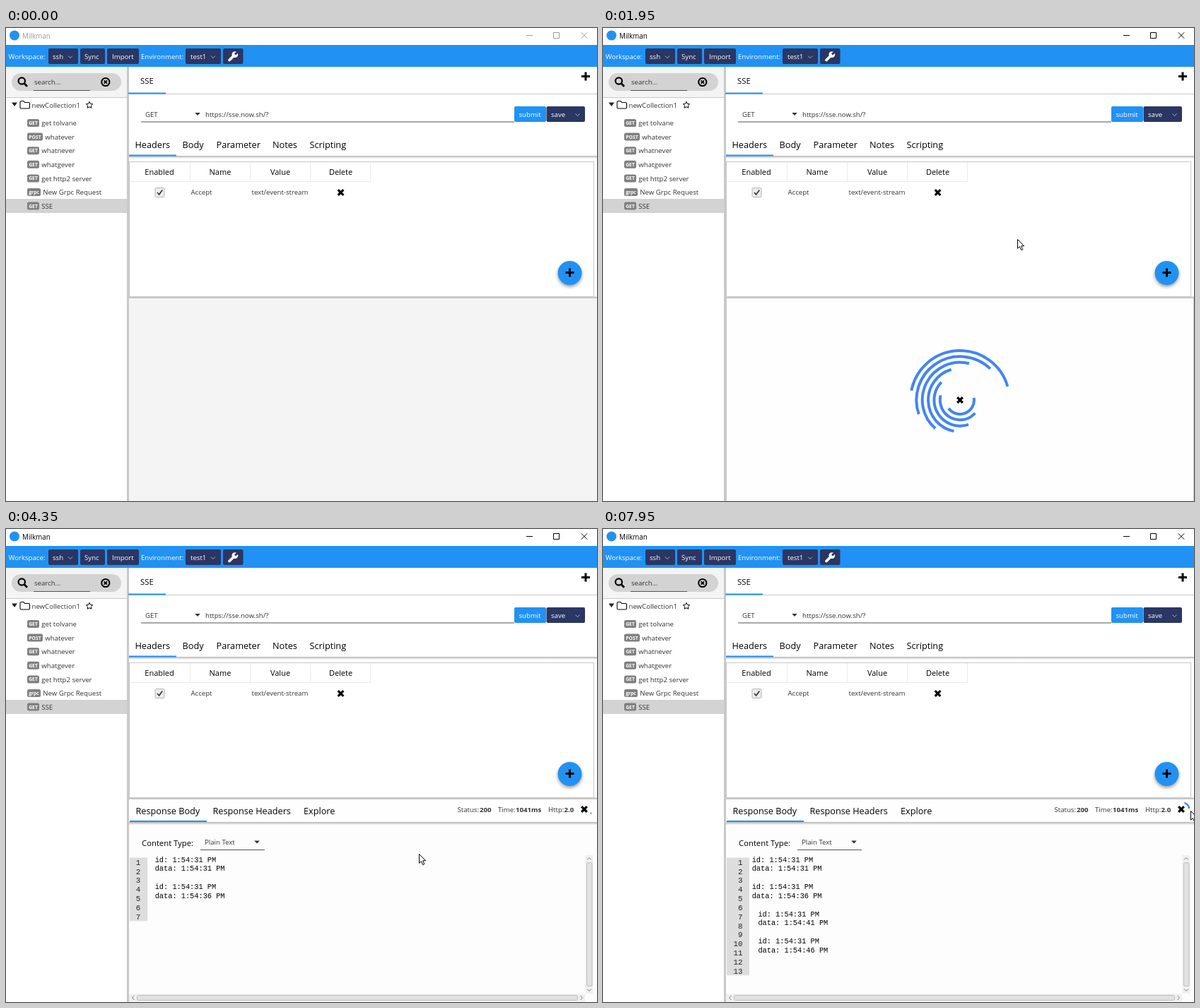
Recreate the animation shown at these times as an HTML page. Size 836 px wide and 670 px high, loop 8000 ms.

```html
<!DOCTYPE html>
<html lang="en">
<head>
<meta charset="utf-8">
<title>Milkman</title>
<style>
  html, body { margin: 0; width: 100%; height: 100%; overflow: hidden; background: #fff; }
  svg { display: block; width: 836px; height: 670px; }
  text { font: 9.65px "Open Sans", "Noto Sans", sans-serif; fill: #333; white-space: pre; }
  .tab { font-size: 12.7px; fill: #000; }
  .head { font-size: 11px; fill: #000; text-anchor: middle; }
  .inv { fill: #fff; }
  .b { font-weight: 700; }
  .badge { font-size: 6.8px; font-weight: 700; fill: #fff; text-anchor: middle; }
  .code { font: 10.3px "Liberation Mono", "Courier New", monospace; fill: #000; }
  .num { font: 10.8px "Liberation Mono", "Courier New", monospace; fill: #222; text-anchor: end; }
  .blue { fill: #2192f3; }
  .dark { fill: #2a3663; }
  .gray { fill: #c8c8c8; }
  .line { fill: none; stroke: #000; }
  .chev { fill: none; stroke: #a9aec4; stroke-width: 1; }
</style>
</head>
<body>
<svg viewBox="0 0 836 670">
  <defs>
    <linearGradient id="shade" x2="0" y2="1">
      <stop offset="0" stop-color="#b4b4b4"/><stop offset="1" stop-color="#fff"/>
    </linearGradient>
    <filter id="soft" x="-50%" y="-50%" width="200%" height="200%"><feGaussianBlur stdDeviation="2.5"/></filter>
    <path id="cross" d="M-3.8-3.8 3.8 3.8M3.8-3.8-3.8 3.8" stroke="#000" stroke-width="3.2"/>
    <path id="plus" d="M-6 0H6M0-6V6" stroke="#000" stroke-width="3"/>
    <path id="caret" d="M-3.8-2H3.8L0 2Z" fill="#333"/>
    <path id="chev" class="chev" d="M-3-1.5 0 1.5 3-1.5"/>
  </defs>

  <!-- title bar -->
  <rect width="836" height="670" fill="#fff"/>
  <circle cx="12" cy="10.5" r="7" class="blue"/>
  <text id="title" x="23" y="14.5" style="font-size:9.9px">Milkman</text>
  <path id="winBtns" class="line" d="M736 10.5H745M774.5 6.5h8v8h-8ZM813.8 6.3l8.4 8.4M822.2 6.3l-8.4 8.4"/>

  <!-- toolbar -->
  <rect y="24" width="836" height="31" class="blue"/>
  <g class="dark">
    <rect x="60" y="29" width="42" height="22" rx="2"/>
    <rect x="105" y="29" width="35" height="22" rx="2"/>
    <rect x="143" y="29" width="45" height="22" rx="2"/>
    <rect x="254" y="29" width="50" height="22" rx="2"/>
    <rect x="307" y="29" width="28.500" height="22" rx="2"/>
  </g>
  <text class="inv" x="3.500" y="44">Workspace:</text>
  <text class="inv" x="66" y="44">ssh</text>
  <text class="inv" x="111" y="44">Sync</text>
  <text class="inv" x="150" y="44">Import</text>
  <text class="inv" x="191" y="44">Environment:</text>
  <text class="inv" x="261" y="44">test1</text>
  <use href="#chev" x="91" y="41"/><use href="#chev" x="293" y="41"/>
  <path d="M316 45.500 323 38.500" stroke="#fff" stroke-width="3.800" stroke-linecap="round"/>
  <circle cx="323.800" cy="37.600" r="4.400" fill="#fff"/>
  <path d="M324 37.500 329 32.500" stroke="#2a3663" stroke-width="3"/>

  <!-- sidebar -->
  <rect y="55" width="171" height="43" fill="#f4f4f4"/>
  <rect y="98" width="171" height="1" class="gray"/>
  <rect x="8" y="64" width="155" height="25" rx="12.500" fill="#d3d3d3"/>
  <circle cx="22.300" cy="75" r="4.700" class="line" stroke-width="2.200"/>
  <path class="line" d="M25.800 78.500 30 82.700" stroke-width="2.800"/>
  <text x="40" y="80" fill="#555">search...</text>
  <rect x="39" y="88" width="80" height="1" fill="#555"/>
  <circle cx="140.800" cy="76.500" r="5.600" class="line" stroke-width="2"/>
  <path class="line" d="M138.600 74.300l4.400 4.400M143 74.300l-4.400 4.400" stroke-width="1.900"/>
  <path d="M8 105.500H16L12 111Z" fill="#222"/>
  <path class="line" d="M20 105q0-1.500 1.500-1.500H25l1.500 2H32q1.500 0 1.500 1.500v5.500q0 1.500-1.500 1.500H21.500q-1.500 0-1.500-1.500Z" stroke-width="1.100"/>
  <text x="36.500" y="112.500">newCollection1</text>
  <path class="line" d="M118 104.300l1.400 3 3.300.4-2.400 2.300.6 3.300-2.900-1.600-2.900 1.600.6-3.300-2.400-2.300 3.300-.4Z"/>
  <rect y="242" width="171" height="20" fill="#d3d3d3"/>
  <g id="tree"></g>
  <rect x="171" y="55" width="3" height="615" class="gray"/>

  <!-- request -->
  <text x="190" y="79" style="font-size:11.300px;fill:#000">SSE</text>
  <rect x="174" y="93" width="662" height="1" class="gray"/>
  <rect x="173" y="91.500" width="53" height="2" class="blue"/>
  <use href="#plus" x="820" y="68.500"/>
  <text x="197" y="125.500">GET</text>
  <use href="#caret" x="271" y="122"/>
  <text x="282" y="125.500">https://sse.now.sh/?</text>
  <rect x="191" y="132.500" width="528" height="1" fill="#555"/>
  <rect x="719" y="111" width="45" height="22" rx="2" class="blue"/>
  <rect x="764.500" y="111" width="54.500" height="22" rx="2" class="dark"/>
  <text class="inv" x="725.500" y="125.500">submit</text>
  <text class="inv" x="771" y="125.500">save</text>
  <use href="#chev" x="808.500" y="123"/>
  <text class="tab" x="182.500" y="170">Headers</text>
  <text class="tab" x="249.500" y="170">Body</text>
  <text class="tab" x="297.500" y="170">Parameter</text>
  <text class="tab" x="377" y="170">Notes</text>
  <text class="tab" x="429.500" y="170">Scripting</text>
  <rect x="174" y="181" width="662" height="4" fill="url(#shade)"/>
  <rect x="174" y="179.500" width="67" height="2" class="blue"/>
  <rect x="174.500" y="189.500" width="657" height="191" fill="#fff" stroke="#c8c8c8"/>
  <path d="M175 217.500H515M260.500 190V218M345.500 190V218M430.500 190V218M515.500 190V218" stroke="#ebebeb"/>
  <text class="head" x="217" y="208">Enabled</text>
  <text class="head" x="303" y="208">Name</text>
  <text class="head" x="388" y="208">Value</text>
  <text class="head" x="473.500" y="208">Delete</text>
  <rect x="211" y="226.500" width="13" height="13" rx="1.500" fill="#ececec" stroke="#b5b5b5"/>
  <path class="line" d="M214 233l2.600 3 4.600-6.400" style="stroke:#333;stroke-width:1.700"/>
  <text x="261.500" y="236">Accept</text>
  <text x="347.500" y="236">text/event-stream</text>
  <use href="#cross" x="473.500" y="233"/>
  <circle cx="797.500" cy="349.500" r="17" fill="#000" opacity=".4" filter="url(#soft)"/>
  <circle cx="797.500" cy="347" r="17" class="blue"/>
  <use href="#plus" x="797.500" y="346.500"/>

  <!-- response -->
  <rect x="174" y="380.500" width="662" height="3" class="gray"/>
  <rect id="idle" x="174" y="383" width="662" height="287" fill="#f4f4f4"/>
  <g id="wait">
    <path d="M174.500 383V670M835.500 383V670" stroke="#c8c8c8"/>
    <path id="swirl" fill="none" stroke="#4285f4" stroke-width="4"/>
    <use href="#cross" x="505" y="527"/>
  </g>
  <g id="result">
    <rect x="174" y="416" width="662" height="254" fill="#fdfdfd"/>
    <text class="tab" x="183.500" y="404">Response Body</text>
    <text class="tab" x="292.500" y="404">Response Headers</text>
    <text class="tab" x="421" y="404">Explore</text>
    <rect x="174" y="415" width="662" height="4.500" fill="url(#shade)"/>
    <rect x="175" y="413" width="109" height="2" class="blue"/>
    <text x="638.500" y="400.500">Status:</text><text class="b" x="670" y="400.500">200</text>
    <text x="696" y="400.500">Time:</text><text class="b" x="721" y="400.500">1041ms</text>
    <text x="767" y="400.500">Http:</text><text class="b" x="789.500" y="400.500">2.0</text>
    <use href="#cross" x="818" y="397"/>
    <path id="ring" fill="none" stroke-width="2.400"/>
    <text x="192" y="448.500" style="font-size:11.300px;fill:#000">Content Type:</text>
    <text x="281" y="447">Plain Text</text>
    <use href="#caret" x="355" y="443.500"/>
    <rect x="275" y="454" width="91" height="1" fill="#555"/>
    <rect id="gutter" x="175" y="465.500" fill="#ddd"/>
    <g id="nums"></g>
    <g id="lines"></g>
    <rect x="819.500" y="462" width="11" height="196" fill="#f0f0f0"/>
    <rect x="174" y="658.500" width="645" height="11" fill="#f0f0f0"/>
    <g fill="#e2e2e2" stroke="#bdbdbd">
      <rect x="821.500" y="472.500" width="7.500" height="175" rx="2"/>
      <rect x="185.500" y="660.500" width="623" height="7" rx="2"/>
    </g>
    <path class="line" d="M822 468.500l3-3 3 3M822 651.500l3 3 3-3M181.500 661l-3 3 3 3M812.500 661l3 3-3 3" style="stroke:#777"/>
  </g>
  <path id="cursor" d="M.5.500V13.300L3.400 10.600 5.600 15.600 7.800 14.700 5.700 9.800H9.600Z" fill="#fff" stroke="#000"/>
</svg>
<script>
const $ = id => document.getElementById(id);
const LOOP = 8000, CLICK = 930, REPLY = 2350;
const EVENTS = [REPLY, 3750, 5150, 6550];
const PATH = [
  [100, 716, 631], [300, 720, 540], [500, 732, 330], [700, 742, 150], [800, 743, 116],
  [1150, 743, 116], [1650, 610, 261], [1850, 586, 299], [2550, 586, 299],
  [3450, 581, 426], [3650, 584, 460], [6650, 584, 460], [7050, 682, 458], [7850, 831, 399]
];
const PHASE = [[REPLY, 0], [4350, 4.205], [5550, 6.15], [7950, 12.2]];
// Within one colour: time in s, start angle, arc length
const SWEEP = [[0, 45, 5], [.4, 90, 250], [.7, 135, 250], [1.1, 435, 5], [1.4, 495, 5]];
const HUES = [[66, 133, 244], [219, 68, 55], [244, 180, 0], [15, 157, 88]];

// Linear interpolation in a table of [time, ...values]
function at(table, t) {
  if (t <= table[0][0]) return table[0].slice(1);
  const i = table.findIndex(row => row[0] > t);
  if (i < 0) return table[table.length - 1].slice(1);
  const a = table[i - 1], b = table[i], k = (t - a[0]) / (b[0] - a[0]);
  return a.slice(1).map((v, j) => v + (b[j + 1] - v) * k);
}

// Clockwise arc, degrees from the right
function arc(cx, cy, r, start, span) {
  const p = deg => {
    const a = deg * Math.PI / 180;
    return (cx + r * Math.cos(a)).toFixed(2) + " " + (cy + r * Math.sin(a)).toFixed(2);
  };
  return `M${p(start)}A${r} ${r} 0 ${span > 180 ? 1 : 0} 1 ${p(start + span)}`;
}

const label = (cls, x, y, s) => `<text class="${cls}" x="${x}" y="${y}">${s}</text>`;

$("tree").innerHTML = [
  ["GET", 17, "get tolvane"], ["POST", 22, "whatever"], ["GET", 17, "whatnever"], ["GET", 17, "whatgever"],
  ["GET", 17, "get http2 server"], ["grpc", 19, "New Grpc Request"], ["GET", 17, "SSE"]
].map(([kind, w, name], i) => {
  const y = 134.5 + i * 19.6;
  return `<rect x="30" y="${y - 5.5}" width="${w}" height="11" rx="2.5" fill="#808080"/>` +
    label("badge", 30 + w / 2, y + 2.5, kind) + label("", 33.3 + w, y + 3.7, name);
}).join("");

const PITCH = 12.83;
let shown = -1;
function fillEditor(n) {
  if (n === shown) return;
  shown = n;
  const rows = n * 3 + 1, wide = rows > 9;
  $("gutter").setAttribute("width", wide ? 32 : 25);
  $("gutter").setAttribute("height", rows * PITCH);
  let nums = "", lines = "";
  for (let i = 0; i < rows; i++) nums += label("num", wide ? 197.5 : 190.3, 475.7 + i * PITCH, i + 1);
  for (let i = 0; i < n; i++) {
    const x = i < 2 ? 210.7 : 219.4, y = 471.6 + i * 3 * PITCH;
    lines += label("code", x, y, "id: 1:54:31 PM") +
      label("code", x, y + PITCH, `data: 1:54:${31 + i * 5} PM`);
  }
  $("nums").innerHTML = nums;
  $("lines").innerHTML = lines;
}

function drawSwirl(t) {
  const k = (t - 1050) / 900, base = 60 + 491 * k, span = 117 + 36 * k;
  let d = "";
  for (let i = 0; i < 7; i++)
    d += arc(505, 527, 70 - i * 8.35, base - i * 30 - (i === 6 ? 20 : 0), span);
  $("swirl").setAttribute("d", d);
}

function drawRing(t) {
  const p = at(PHASE, t)[0] % 5.6, n = Math.floor(p / 1.4), s = p - n * 1.4;
  const [start, len] = at(SWEEP, s);
  const mix = n < 3 ? Math.max(0, (s - 1.1) / .3) : 0;
  const next = HUES[(n + 1) % 4];
  const rgb = HUES[n].map((v, i) => Math.round(v + (next[i] - v) * mix));
  $("ring").setAttribute("d", arc(819.5, 397, 9.6, -(n * 450 + start + 6 + len), len));
  $("ring").setAttribute("stroke", `rgb(${rgb})`);
}

function step(t) {
  if (t < CLICK) return Math.floor(t / 100) * 100;
  return t < 950 ? CLICK : 950 + Math.floor((t - 950) / 100) * 100;
}

const show = (id, on) => $(id).style.display = on ? "" : "none";

function draw(now) {
  const t = step(now % LOOP), active = t >= CLICK, done = t >= REPLY;
  $("title").style.fill = active ? "#000" : "#999";
  $("winBtns").style.stroke = active ? "#000" : "#999";
  $("idle").style.fill = active ? "#fefefe" : "#f4f4f4";
  show("wait", active && !done);
  show("result", done);
  if (active && !done) drawSwirl(t);
  if (done) {
    fillEditor(EVENTS.filter(e => t >= e).length);
    drawRing(t);
  }
  show("cursor", t >= 100);
  $("cursor").setAttribute("transform", `translate(${at(PATH, t).map(Math.round)})`);
}

const begin = performance.now();
function tick() {
  draw(performance.now() - begin);
  requestAnimationFrame(tick);
}
tick();
</script>
</body>
</html>
```
